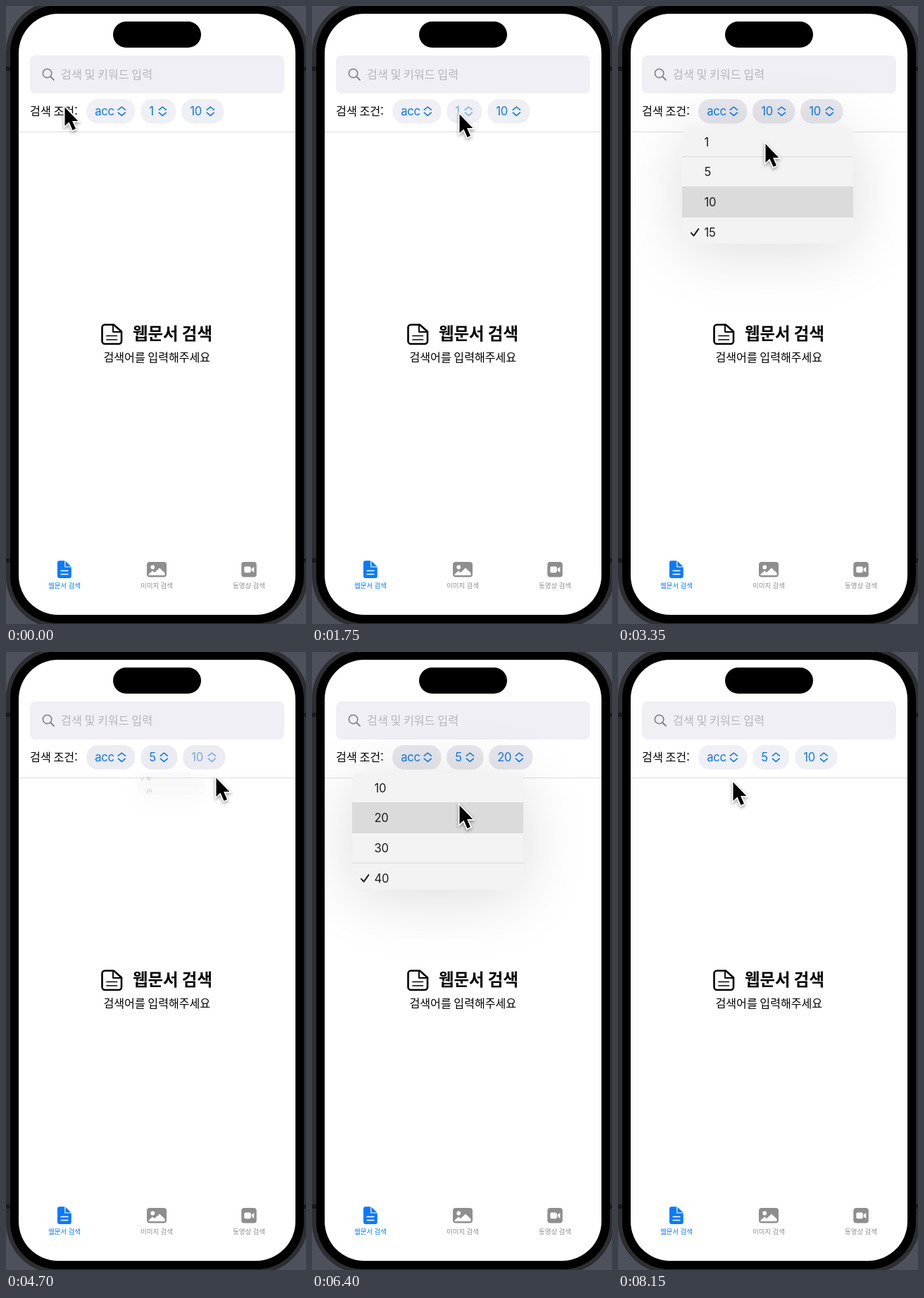
Animation of 426 by 876 pixels, one loop 8200 ms. Source, as an HTML page with a canvas:

```html
<!DOCTYPE html>
<html lang="ko">
<head>
<meta charset="utf-8">
<style>
html, body { margin: 0; width: 100%; height: 100%; overflow: hidden; background: #4d515b; }
canvas { display: block; }
</style>
</head>
<body>
<canvas id="stage" width="426" height="876"></canvas>
<script>
const ctx = document.getElementById('stage').getContext('2d');
const LOOP = 8200, STEP = 50;
const BLUE = '#0a7aff', GRAY = '#8e8e8e';
const KOREAN = '"Noto Sans CJK KR", "Noto Sans CJK", sans-serif';
const LATIN = 'Inter, sans-serif';
const MENU = { top: 171, width: 243, row: 42.7, openMs: 260, closeMs: 200, closeDelay: 70 };

const menus = [
  { left: 114, anchor: 149, options: ['acc', 'rec'] },
  { left: 91, anchor: 212, options: ['1', '5', '10', '15'] },
  { left: 57, anchor: 271, options: ['10', '20', '30', '40'] }
];

// Each pick presses a button, opens its menu and chooses an option.
const picks = [
  { menu: 0, open: 200, select: 560, value: 'rec', button: [148, 149], target: [160, 232] },
  { menu: 0, open: 900, select: 1240, value: 'acc', button: [150, 150], target: [160, 190] },
  { menu: 1, open: 1765, select: 2080, value: '10', button: [209, 153], target: [209, 272] },
  { menu: 1, open: 2420, select: 2740, value: '15', button: [211, 152], target: [211, 315] },
  { menu: 1, open: 3020, select: 3280, value: '10', button: [211, 152], target: [209, 272], via: [3350, 209, 195] },
  { menu: 1, open: 3700, select: 4030, value: '5', button: [211, 152], target: [209, 230] },
  { menu: 2, open: 4660, select: 5020, value: '30', button: [284, 151], target: [270, 273], via: [4700, 298, 178] },
  { menu: 2, open: 5359, select: 5720, value: '40', button: [281, 151], target: [270, 313], via: [5450, 282, 267] },
  { menu: 2, open: 6050, select: 6360, value: '20', button: [281, 151], target: [209, 217] },
  { menu: 2, open: 6700, select: 7020, value: '10', button: [281, 151], target: [163, 184] }
];

const current = ['acc', '1', '10'];
for (const p of picks) {
  p.before = current[p.menu];
  current[p.menu] = p.value;
}

const cursorKeys = [[0, 83, 143], [50, 83, 143]];
for (const p of picks) {
  cursorKeys.push([p.open - 70, ...p.button], [p.open, ...p.button],
    [p.select - 60, ...p.target], [p.select + 40, ...p.target]);
  if (p.via) cursorKeys.push(p.via);
}
cursorKeys.sort((a, b) => a[0] - b[0]);

const clamp = v => Math.max(0, Math.min(1, v));
const smooth = v => v * v * (3 - 2 * v);

function box(x, y, w, h, r, color) {
  ctx.beginPath();
  ctx.roundRect(x, y, w, h, r);
  ctx.fillStyle = color;
  ctx.fill();
}

function trace(points, closed) {
  ctx.beginPath();
  points.forEach(([x, y]) => ctx.lineTo(x, y));
  if (closed) ctx.closePath();
}

function line(points, color, width) {
  trace(points);
  ctx.strokeStyle = color;
  ctx.lineWidth = width;
  ctx.stroke();
}

function shape(points, color) {
  trace(points, true);
  ctx.fillStyle = color;
  ctx.fill();
}

function dot(x, y, r) {
  ctx.beginPath();
  ctx.arc(x, y, r, 0, Math.PI * 2);
}

function text(str, x, y, size, color, family = KOREAN, weight = 400) {
  ctx.font = `${weight} ${size}px ${family}`;
  ctx.letterSpacing = family === LATIN ? '-0.3px' : '0px';
  ctx.fillStyle = color;
  ctx.fillText(str, x, y);
}

function cursorAt(t) {
  const next = cursorKeys.findIndex(k => k[0] > t);
  if (next < 0) return cursorKeys[cursorKeys.length - 1].slice(1);
  const a = cursorKeys[next - 1], b = cursorKeys[next];
  const u = smooth((t - a[0]) / (b[0] - a[0]));
  return [a[1] + (b[1] - a[1]) * u, a[2] + (b[2] - a[2]) * u];
}

function menuScale(p, t) {
  if (t < p.open) return 0;
  const closing = clamp((t - p.select - MENU.closeDelay) / MENU.closeMs);
  if (closing) return 1 - smooth(closing);
  return 1 - (1 - clamp((t - p.open) / MENU.openMs)) ** 3;
}

function valueAt(menu, t) {
  const own = picks.filter(p => p.menu === menu);
  const done = own.filter(p => t >= p.select);
  return done.length ? done[done.length - 1].value : own[0].before;
}

function pressAlpha(menu, t) {
  const p = picks.find(q => q.menu === menu && t >= q.open - 50 && t < q.open + 260);
  return p ? 0.55 + 0.45 * clamp((t - p.open - 140) / 120) : 1;
}

function pillWidth(value) {
  if (value === 'acc') return 69;
  if (value === 'rec') return 66;
  if (value.length === 1) return value === '1' ? 50 : 52;
  return value[0] === '1' ? 60 : 62;
}

function drawPills(t, shade) {
  let x = 114.3;
  for (let i = 0; i < 3; i++) {
    const value = valueAt(i, t), w = pillWidth(value);
    box(x, 132, w, 34.5, 16, '#efeff6');
    box(x, 132, w, 34.5, 16, `rgba(0,0,0,${0.035 * shade})`);
    ctx.globalAlpha = pressAlpha(i, t);
    text(value, x + 12, 155, 16.6, '#0f78ee', LATIN);
    const c = x + w - 19;
    line([[c - 5, 147.2], [c, 143], [c + 5, 147.2]], '#0f78ee', 1.6);
    line([[c - 5, 151.2], [c, 155.4], [c + 5, 151.2]], '#0f78ee', 1.6);
    ctx.globalAlpha = 1;
    x += w + 8;
  }
}

function drawMenu(p, s, t) {
  const { left, anchor, options } = menus[p.menu];
  const { top, width, row } = MENU;
  const h = options.length * row * (0.15 + 0.82 * s);
  ctx.save();
  ctx.globalAlpha = clamp((s - 0.2) / 0.74);
  ctx.translate(anchor, top);
  ctx.scale(s, s);
  ctx.translate(left - anchor, 0);
  ctx.shadowColor = 'rgba(0,0,0,.14)';
  ctx.shadowBlur = 90 * s;
  ctx.shadowOffsetY = 10 * s;
  box(0, 0, width, h, 11, '#f3f3f3');
  ctx.shadowColor = 'transparent';
  ctx.clip();
  options.forEach((option, i) => {
    const y = i * row;
    if (option === p.value && t >= p.select - 40) {
      ctx.fillStyle = '#dbdbdb';
      ctx.fillRect(0, y, width, row);
    }
    if (i) line([[0, y], [width, y]], '#d2d2d2', 0.8);
    text(option, 31.5, y + 27.6, 16.6, '#1c1c1c', LATIN);
    if (option === p.before) {
      line([[13, y + 22.5], [16.5, y + 26.5], [23.3, y + 17]], '#1c1c1c', 2);
    }
  });
  ctx.restore();
}

function drawHeader() {
  box(34, 70, 361, 54, 8, '#f0eff6');
  dot(58.6, 95.4, 6.2);
  ctx.strokeStyle = '#7d7d82';
  ctx.lineWidth = 1.6;
  ctx.stroke();
  line([[63.2, 100], [68, 104.8]], '#7d7d82', 1.8);
  text('검색 및 키워드 입력', 78, 103, 16.2, '#b6b6bb');
  text('검색 조건:', 34, 155, 16.2, '#000');
  ctx.fillStyle = '#dededf';
  ctx.fillRect(18, 178, 393, 1);
}

function drawEmptyState() {
  ctx.beginPath();
  ctx.moveTo(153, 451.8);
  ctx.lineTo(164, 461.5);
  ctx.arcTo(164, 479, 150, 479, 4);
  ctx.arcTo(136.5, 479, 136.5, 465, 4);
  ctx.arcTo(136.5, 451.8, 150, 451.8, 4);
  ctx.closePath();
  ctx.strokeStyle = '#000';
  ctx.lineWidth = 2.6;
  ctx.stroke();
  line([[152, 452], [152, 462], [164, 462]], '#000', 1.9);
  line([[143, 467.5], [157.5, 467.5]], '#000', 1.7);
  line([[143, 473], [157.5, 473]], '#000', 1.7);
  text('웹문서 검색', 180, 473, 23.4, '#000', KOREAN, 700);
  text('검색어를 입력해주세요', 138.5, 504, 16.1, '#000');
}

function drawTabs() {
  ctx.beginPath();
  ctx.moveTo(84, 786.2);
  ctx.lineTo(92.8, 795);
  ctx.arcTo(92.8, 811, 83, 811, 3);
  ctx.arcTo(73, 811, 73, 799, 3);
  ctx.arcTo(73, 786.2, 83, 786.2, 3);
  ctx.closePath();
  ctx.fillStyle = BLUE;
  ctx.fill();
  line([[83.8, 786], [83.8, 795], [93, 795]], '#fff', 1.2);
  line([[78, 800.5], [88, 800.5]], '#fff', 1.4);
  line([[78, 805.5], [88, 805.5]], '#fff', 1.4);

  box(200, 788, 28, 21.5, 4, GRAY);
  dot(208.3, 795.5, 2.9);
  ctx.fillStyle = '#fff';
  ctx.fill();
  shape([[202.5, 807], [202.5, 805.5], [208, 800.5], [211, 803], [218, 796.5], [225.5, 803.5], [225.5, 807]], '#fff');

  box(334.3, 788, 21.5, 21.5, 4, GRAY);
  box(338.3, 794.5, 9.4, 8.8, 1.8, '#fff');
  shape([[348.7, 797.6], [352.3, 795], [352.3, 803], [348.7, 800.2]], '#fff');

  text('웹문서 검색', 60, 825, 9.55, BLUE, KOREAN, 500);
  text('이미지 검색', 191, 825, 9.55, GRAY);
  text('동영상 검색', 322, 825, 9.55, GRAY);
}

function drawPhone() {
  ctx.fillStyle = '#4d515b';
  ctx.fillRect(0, 0, 426, 876);
  box(0, -7, 429, 888, 73, '#2d2e31');
  ctx.fillStyle = '#1a1a1c';
  for (const y of [86, 783]) {
    ctx.fillRect(0, y, 6, 6);
    ctx.fillRect(423, y, 3, 6);
  }
  box(6, -1, 417, 876, 67, '#000');
}

function drawCursor([x, y]) {
  ctx.save();
  ctx.translate(x + 0.5, y + 0.5);
  trace([[0, 0], [0, 26.5], [6, 21], [11, 32.5], [15.5, 30.5], [10.6, 19.6], [18.8, 19.6]], true);
  ctx.lineJoin = 'miter';
  ctx.shadowColor = 'rgba(0,0,0,.4)';
  ctx.shadowBlur = 4;
  ctx.shadowOffsetY = 2;
  ctx.strokeStyle = '#fff';
  ctx.lineWidth = 3.4;
  ctx.stroke();
  ctx.shadowColor = 'transparent';
  ctx.fillStyle = '#000';
  ctx.fill();
  ctx.restore();
}

function draw(t) {
  const active = picks.find(p => menuScale(p, t) > 0);
  const scale = active ? menuScale(active, t) : 0;
  ctx.lineCap = ctx.lineJoin = 'round';
  drawPhone();
  ctx.save();
  box(18, 11, 393, 852, 56, '#fff');
  ctx.clip();
  drawHeader();
  drawPills(t, scale);
  drawEmptyState();
  drawTabs();
  if (scale > 0.01) drawMenu(active, scale, t);
  ctx.restore();
  box(152, 22, 125, 37, 18.5, '#000');
  drawCursor(cursorAt(t));
}

const start = performance.now();
function tick() {
  const t = (performance.now() - start) % LOOP;
  draw(Math.floor(t / STEP) * STEP);
  requestAnimationFrame(tick);
}
tick();
</script>
</body>
</html>
```
